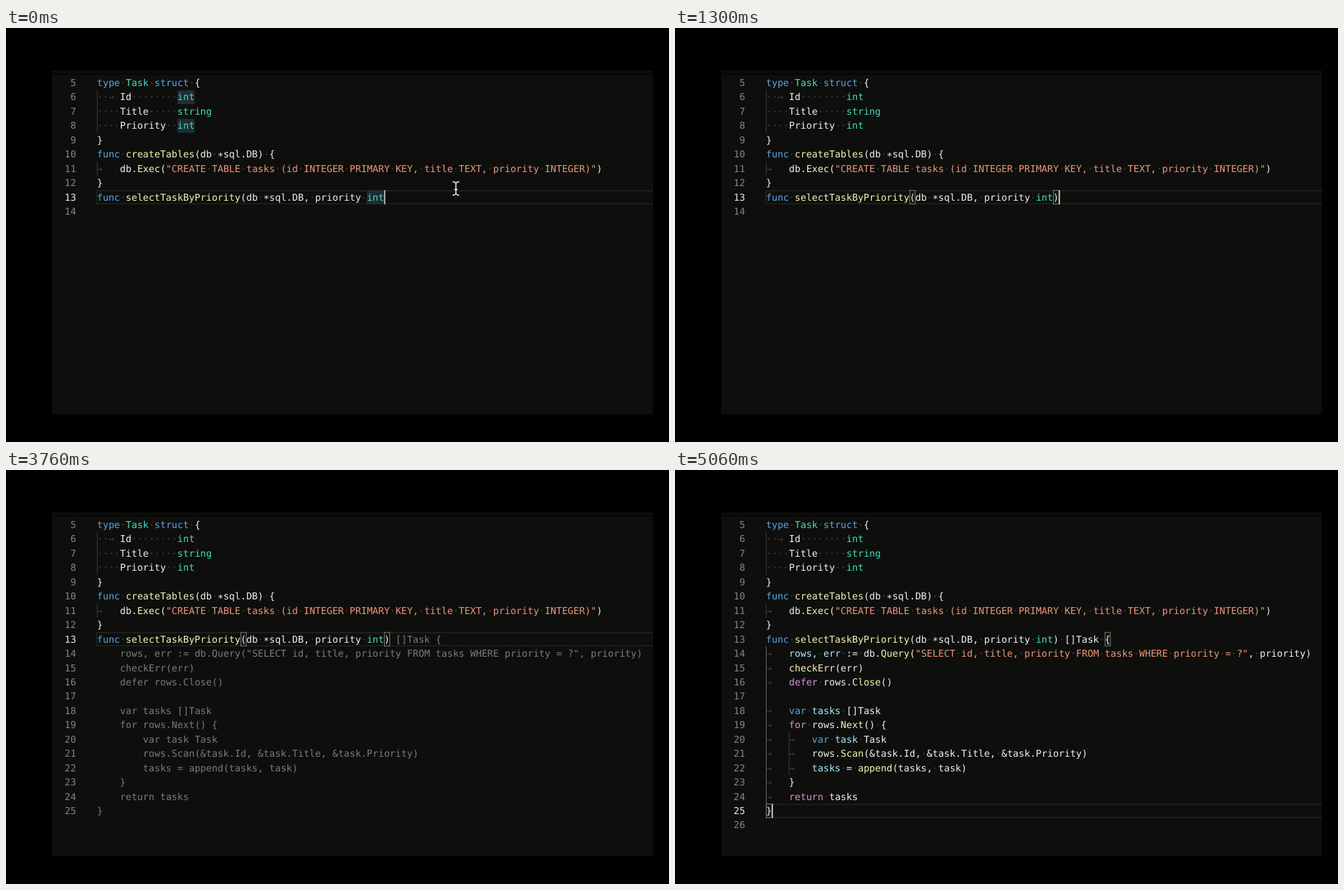
These frames come from a looping animation (947x592 px, 5.36 s). An HTML page:

```html
<!DOCTYPE html>
<html lang="en">
<head>
<meta charset="utf-8">
<title>Code completion</title>
<style>
  html, body { margin: 0; width: 100%; height: 100%; overflow: hidden; background: #010103; }
  svg { display: block; position: absolute; left: 0; top: 0; }
  text {
    font: 13.62px "DejaVu Sans Mono", "Liberation Mono", monospace;
    text-rendering: geometricPrecision;
    font-variant-ligatures: none;
  }
</style>
</head>
<body>
<svg id="stage" width="947" height="592" viewBox="0 0 947 592"></svg>
<script>
const LOOP = 5360;
const LEFT = 130, CHAR = 8.2, ROW = 20.45, FIRST = 5, TOP = 68.1, RIGHT = 924;
const TYPED = 1230, GHOST = 1330, ACCEPT = 4100, SETTLED = 4130;

const COLORS = {
  w: '#f0f0ee', k: '#5ba4e2', t: '#45dbbc', f: '#f5f4b9', s: '#ec9677',
  v: '#a6eaff', c: '#dc8fd8', g: '#7b7c7a', dot: '#40423f'
};

// Segments are split by "|"; the first letter picks the colour.
const BASE = [
  'ktype|w |tTask|w |kstruct|w {',
  'w  \tId        |tint',
  'w    Title     |tstring',
  'w    Priority  |tint',
  'w}',
  'kfunc|w |fcreateTables|w(db *sql.DB) {',
  'w\tdb.|fExec|w(|s"CREATE TABLE tasks (id INTEGER PRIMARY KEY, title TEXT, priority INTEGER)"|w)',
  'w}',
  'kfunc|w |fselectTaskByPriority|w(db *sql.DB, priority |tint'
];

const BODY = [
  'w\t|vrows, err|w := db.|fQuery|w(|s"SELECT id, title, priority FROM tasks WHERE priority = ?"|w, priority)',
  'w\t|fcheckErr|w(err)',
  'w\t|cdefer|w rows.|fClose|w()',
  'w',
  'w\t|kvar|w |vtasks|w []Task',
  'w\t|cfor|w rows.|fNext|w() {',
  'w\t\t|kvar|w |vtask|w Task',
  'w\t\trows.|fScan|w(&task.Id, &task.Title, &task.Priority)',
  'w\t\t|vtasks|w = |fappend|w(tasks, task)',
  'w\t}',
  'w\t|creturn|w tasks',
  'w}'
];

const stage = document.getElementById('stage');
const layers = [];
const colX = col => LEFT + col * CHAR;
const rowY = line => TOP + (line - FIRST) * ROW;

function add(parent, tag, attrs, content) {
  const el = document.createElementNS('http://www.w3.org/2000/svg', tag);
  for (const name in attrs) el.setAttribute(name, attrs[name]);
  if (content !== undefined) el.textContent = content;
  parent.appendChild(el);
  return el;
}

// A group that is visible only inside the given [from, to) spans.
function layer(...spans) {
  const el = add(stage, 'g', {});
  layers.push({ el, spans });
  return el;
}

const rect = (g, x, y, width, height, fill) => add(g, 'rect', { x, y, width, height, fill });

function glyphs(g, col, line, str, fill) {
  const lift = str === '*' ? 2.3 : 0;
  add(g, 'text', { x: colX(col), y: rowY(line) + 14.9 + lift, fill }, str);
}

// Draws one line of code and returns the column where it ends.
function code(g, line, src, col = 0, ghost = false) {
  for (const seg of src.split('|')) {
    const fill = ghost ? COLORS.g : COLORS[seg[0]];
    for (const part of seg.slice(1).match(/[ \t*]|[^ \t*]+/g) || []) {
      const tab = part === '\t';
      if (tab || part === ' ') {
        if (!ghost) glyphs(g, col, line, tab ? '→' : '·', COLORS.dot);
      } else {
        glyphs(g, col, line, part, fill);
      }
      col += tab ? 4 - col % 4 : part.length;
    }
  }
  return col;
}

function number(g, line, active) {
  add(g, 'text', {
    x: 100.2, y: rowY(line) + 14.9, 'text-anchor': 'end',
    fill: active ? '#e8e8e6' : '#838482'
  }, line);
}

function numbers(g, from, to) {
  for (let n = from; n <= to; n++) number(g, n);
}

function box(g, line, from, to) {
  add(g, 'rect', {
    x: colX(from) + .4, y: rowY(line) + .5,
    width: Math.max((to - from) * CHAR - .5, .3), height: ROW - .9,
    fill: '#0d170c', stroke: '#858784', 'stroke-width': .9
  });
}

function guide(g, col, from, to, fill) {
  rect(g, colX(col) - .2, rowY(from), 1, (to - from + 1) * ROW, fill);
}

function activeLine(g, line) {
  add(g, 'path', {
    d: `M${RIGHT} ${rowY(line) + 1}H${LEFT}v${ROW - 1.8}H${RIGHT}`,
    fill: 'none', stroke: '#242523', 'stroke-width': 1.4
  });
  number(g, line, true);
}

function caret(line, col, ...spans) {
  rect(layer(...spans), colX(col) + .1, rowY(line) + .2, 1.7, ROW - .2, '#c4c5c2');
}

// Window
const back = layer([0, LOOP]);
rect(back, 0, 0, 947, 592, '#010103');
rect(back, 0, 588, 947, 4, '#000');
rect(back, 66, 61, RIGHT - 66, 491, '#0e0f0d');
rect(back, 66, 64.5, RIGHT - 66, 1.5, '#050604');
rect(back, 66, 66, RIGHT - 66, 1.5, '#0a0b09');

// Backgrounds
activeLine(layer([0, ACCEPT]), 13);
activeLine(layer([ACCEPT, LOOP]), 25);

const marks = layer([0, 1260]);
for (const [line, col] of [[6, 14], [8, 14], [13, 47]])
  rect(marks, colX(col), rowY(line) + .4, 3 * CHAR, ROW - .4, '#202c33');

const pair = layer([1300, ACCEPT]);
box(pair, 13, 25, 26);
box(pair, 13, 50, 51);

const inserted = layer([ACCEPT, SETTLED]);
box(inserted, 13, 25, 26);
box(inserted, 13, 50, 60);

const ends = layer([SETTLED, LOOP]);
box(ends, 13, 59, 60);
box(ends, 25, 0, 1);
guide(ends, 0, 14, 24, '#6a6b69');

// Text
const base = layer([0, LOOP]);
guide(base, 0, 6, 8, '#3d3e3c');
guide(base, 0, 11, 11, '#3d3e3c');
BASE.forEach((src, i) => code(base, FIRST + i, src));
numbers(base, FIRST, 12);
number(base, 14);

code(layer([TYPED, LOOP]), 13, 'w)', 50);

const ghost = layer([GHOST, ACCEPT]);
code(ghost, 13, 'w []Task {', 51, true);
BODY.forEach((src, i) => code(ghost, 14 + i, src, 0, true));
number(ghost, 25);
numbers(layer([GHOST, LOOP]), 15, 24);

const done = layer([ACCEPT, LOOP]);
guide(done, 4, 20, 22, '#3d3e3c');
code(done, 13, 'w []Task {', 51);
BODY.forEach((src, i) => box(inserted, 14 + i, 0, code(done, 14 + i, src)));
number(done, 13);
number(done, 26);

// Carets
caret(13, 50, [0, 330], [830, TYPED]);
caret(13, 51, [TYPED, 1760], [2260, 2760], [3260, 3760]);
caret(25, 1, [ACCEPT, 4560], [5060, LOOP]);

// Pointer
const pointer = layer([0, TYPED]);
const beam = 'M637.8 219.8q4 0 4.8 2.8q.8-2.8 4.8-2.8M642.6 222v15M637.8 239.2q4 0 4.8-2.8q.8 2.8 4.8 2.8M640.2 231h4.8';
for (const [stroke, width] of [['#000', 3.4], ['#f4f4f4', 1.6]])
  add(pointer, 'path', { d: beam, fill: 'none', stroke, 'stroke-width': width });

const start = performance.now();
function draw(now) {
  const t = Math.max(0, now - start) % LOOP;
  for (const { el, spans } of layers) {
    const on = spans.some(([from, to]) => t >= from && t < to);
    el.setAttribute('visibility', on ? 'visible' : 'hidden');
  }
  requestAnimationFrame(draw);
}
draw(start);
</script>
</body>
</html>
```
